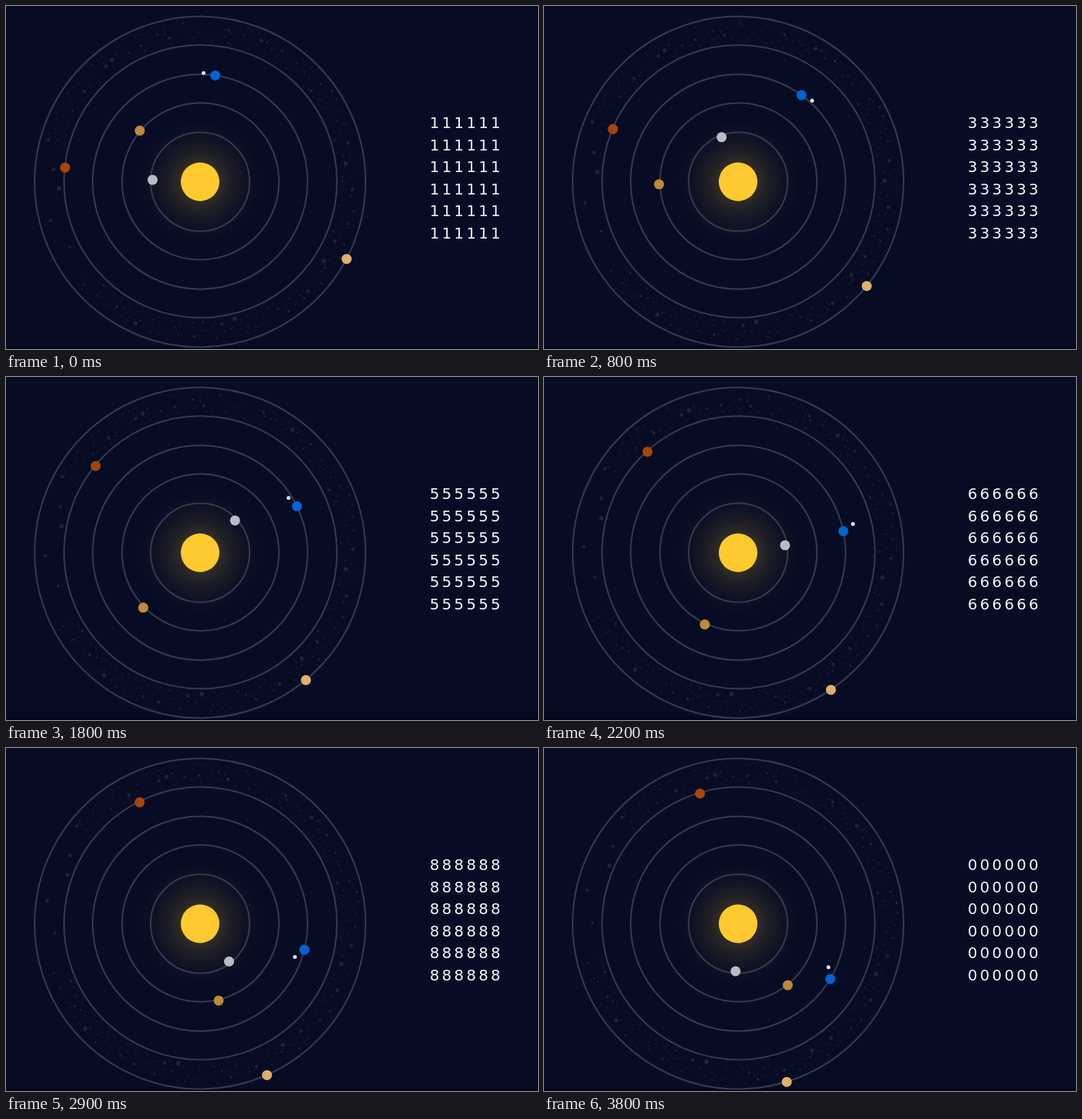
An HTML page for the animation above (3900 ms loop, 688 px wide and 444 px high).

```html
<!DOCTYPE html>
<html lang="en">
<head>
<meta charset="utf-8">
<title>Orrery clock</title>
<style>
  html, body { margin: 0; width: 100%; height: 100%; overflow: hidden; background: #070c24; }
  svg { display: block; width: 688px; height: 444px; }
  text { font: 19.5px "DejaVu Sans", sans-serif; fill: #f5f6fa; text-anchor: middle; }
</style>
</head>
<body>
<svg id="stage" viewBox="0 0 688 444">
  <defs>
    <radialGradient id="glow">
      <stop offset=".3" stop-color="#ffca2f" stop-opacity=".17"/>
      <stop offset=".5" stop-color="#ffca2f" stop-opacity=".09"/>
      <stop offset=".75" stop-color="#ffca2f" stop-opacity=".03"/>
      <stop offset="1" stop-color="#ffca2f" stop-opacity="0"/>
    </radialGradient>
  </defs>
  <rect y="440" width="688" height="4" fill="#03071a"/>
</svg>
<script>
const CX = 251, CY = 227.5, LOOP = 3900, STEP = 100;
const stage = document.getElementById('stage');

function add(parent, tag, attrs) {
  const el = document.createElementNS('http://www.w3.org/2000/svg', tag);
  for (const k in attrs) el.setAttribute(k, attrs[k]);
  return parent.appendChild(el);
}
const dot = (parent, cx, cy, r, fill) => add(parent, 'circle', { cx, cy, r, fill });

// Compass angle: 0 is up, clockwise.
function polar(x, y, r, deg) {
  const a = deg * Math.PI / 180;
  return [x + r * Math.sin(a), y - r * Math.cos(a)];
}
function place(el, [x, y]) {
  el.setAttribute('cx', x.toFixed(2));
  el.setAttribute('cy', y.toFixed(2));
}

let seed = 41;
const rnd = () => (seed = seed * 16807 % 2147483647) / 2147483647;

dot(stage, CX, CY, 80, 'url(#glow)');

// Asteroid belt: sparse rocks all round, dust that thins out on the left.
const belt = add(stage, 'g', {});
function scatter(n, from, span, size, fill) {
  for (let i = 0; i < n; i++) {
    const [x, y] = polar(CX, CY, 182 + rnd() * 25, from + span * (i + rnd()) / n);
    dot(belt, x, y, size * (.6 + rnd() * .5), fill);
  }
}
scatter(320, -75, 305, 1.2, '#151a2b');
scatter(60, -75, 305, 1.5, '#1c2130');
scatter(28, 0, 360, 2.7, '#1f2433');

// Half-pixel radii are snapped to whole pixels, up and to the right.
for (let i = 0; i < 5; i++) {
  const r = 64 + 37.5 * i, snap = r % 1;
  add(stage, 'circle', { cx: CX + snap, cy: CY - snap, r, fill: 'none', stroke: '#363a4d', 'stroke-width': 2 });
}
dot(stage, CX, CY, 25, '#ffca2f');

// Orbit radius, start angle, speed relative to the innermost planet, colour.
const TURN = 33.75;
const planets = [
  [61.5, 272.3, 1, '#b9bcc4'],
  [102.3, 310.3, -5 / 8, '#be8a38'],
  [139, 8.1, 5 / 12, '#0063d1'],
  [175.6, 276, 1 / 4, '#a8440a'],
  [214.2, 117.8, 1 / 6, '#dfb06e']
].map(([r, start, speed, fill]) => ({ r, start, speed, el: dot(stage, 0, 0, 6.5, fill) }));
const earth = planets[2];
const moon = dot(stage, 0, 0, 2.5, '#dcdee4');

const digits = [];
for (let row = 0; row < 6; row++)
  for (let col = 0; col < 6; col++)
    digits.push(add(stage, 'text', { x: 554.2 + col * 15.8, y: 158.2 + row * 28.5 }));

// Start of each tick in ms; every tick settles exponentially.
const ticks = [20, 520, 1020, 1497, 1920, 2420, 2821, 3303, 3799];
const settle = ms => 1 - Math.exp(-ms / 46);

function draw(time) {
  const begun = ticks.filter(start => start <= time);
  const angle = TURN * begun.reduce((sum, start) => sum + settle(time - start), 0);
  for (const p of planets) {
    p.at = polar(CX, CY, p.r, p.start + p.speed * angle);
    place(p.el, p.at);
  }
  place(moon, polar(...earth.at, 15.4, 281.3 + angle * 35 / 12));
  belt.setAttribute('transform', `rotate(${angle / 10} ${CX} ${CY})`);
  for (const d of digits) d.textContent = (begun.length + 1) % 10;
}

const t0 = performance.now();
let shown = -1;
function frame() {
  const step = Math.floor((performance.now() - t0) % LOOP / STEP);
  if (step !== shown) draw((shown = step) * STEP);
  requestAnimationFrame(frame);
}
frame();
</script>
</body>
</html>
```
